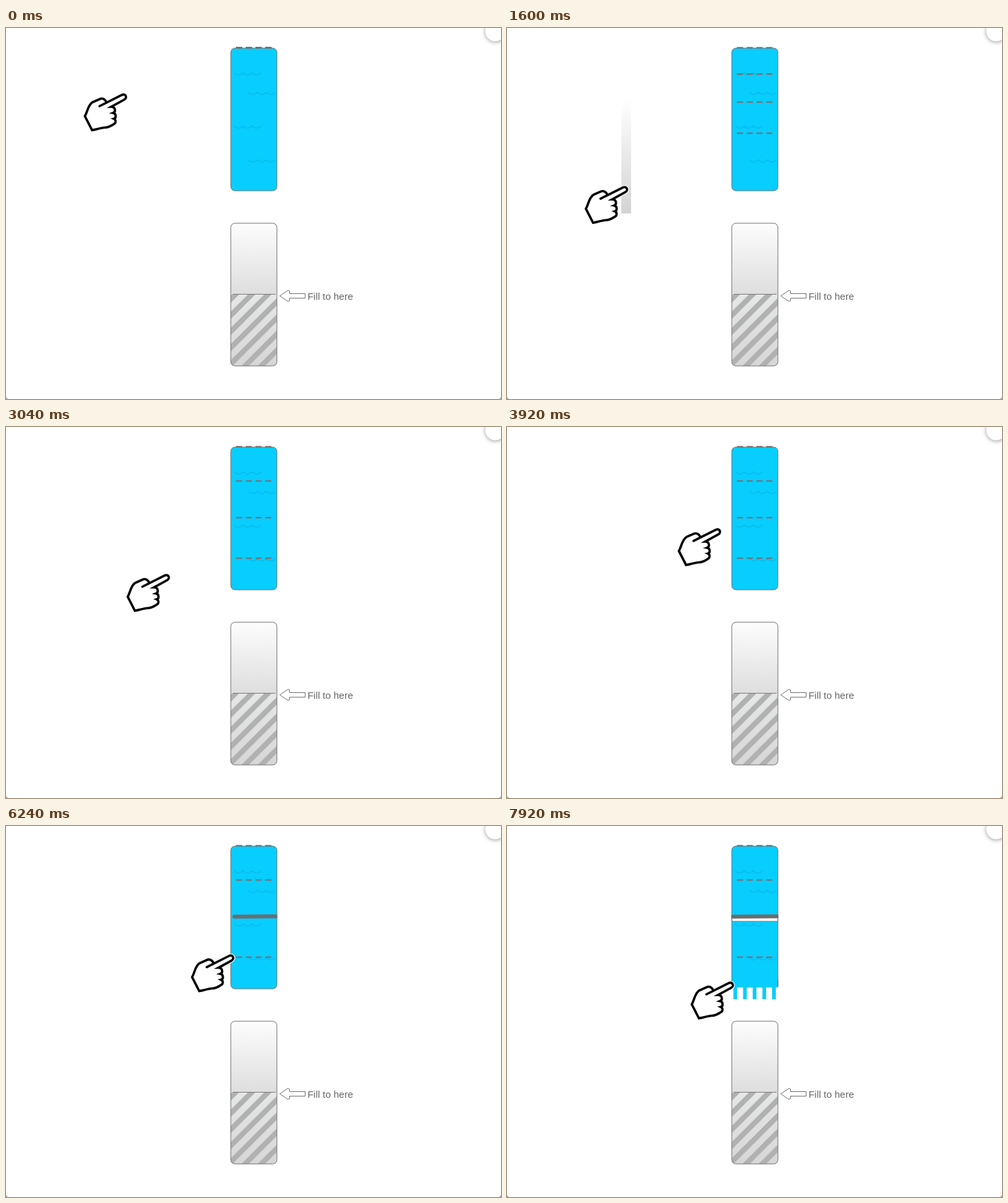
An HTML page with a canvas for the animation above (8 s loop, 762x572 px).

```html
<!DOCTYPE html>
<html lang="en">
<head>
<meta charset="utf-8">
<style>
html, body { margin: 0; width: 100%; height: 100%; overflow: hidden; background: #fff; }
canvas { display: block; }
</style>
</head>
<body>
<canvas id="stage" width="762" height="572"></canvas>
<script>
const ctx = document.getElementById('stage').getContext('2d');
const LOOP = 8000;
const LEFT = 346, WIDTH = 71, HEIGHT = 220;
const handShape = new Path2D(
  'M144 120.5 L178.500 103.200 C184 100.500 187.500 107.500 182 110.500 L162 121.500' +
  ' C169 121.500 169 129.500 165 131 C170 132 170 139 166 140 C170 142 169 146 167 147.500' +
  ' C162 151 157 153.500 152 153.500 C145 154 139 156.500 132.500 157.500 L121.500 136' +
  ' C126 128 126 119 133 114.500 L145.500 109 C150 108 152.500 110 154.500 114.500');

// time, x shift, y shift of the hand
const handPath = [
  [105, 0, 0], [2055, 0, 186], [2290, 0, 186], [4210, 168.5, 32],
  [5150, 168.5, 32], [6240, 165, 97], [6945, 163, 139], [LOOP, 163, 139]
];

const progress = (t, from, to) => Math.min(1, Math.max(0, (t - from) / (to - from)));

function handAt(t) {
  let i = 1;
  while (i < handPath.length - 1 && t > handPath[i][0]) i++;
  const [t0, x0, y0] = handPath[i - 1], [t1, x1, y1] = handPath[i];
  const k = progress(t, t0, t1);
  return [x0 + (x1 - x0) * k, y0 + (y1 - y0) * k];
}

function line(x1, y1, x2, y2, color, width = 1) {
  ctx.strokeStyle = color;
  ctx.lineWidth = width;
  ctx.beginPath();
  ctx.moveTo(x1, y1);
  ctx.lineTo(x2, y2);
  ctx.stroke();
}

function fade(y1, y2, from, to) {
  const g = ctx.createLinearGradient(0, y1, 0, y2);
  g.addColorStop(0, from);
  g.addColorStop(1, to);
  return g;
}

function tube(y) {
  ctx.beginPath();
  ctx.roundRect(LEFT, y, WIDTH, HEIGHT, 6.5);
}

function outline() {
  ctx.strokeStyle = '#707070';
  ctx.lineWidth = 1;
  ctx.stroke();
}

function wave(x, y) {
  ctx.strokeStyle = '#09bceb';
  ctx.lineWidth = 1.6;
  ctx.beginPath();
  ctx.moveTo(x, y - 2);
  for (let i = 0; i < 3; i++) {
    const a = x + i * 14;
    ctx.quadraticCurveTo(a + 7, y + 5, a + 14, y - 2);
  }
  ctx.stroke();
}

function dashes(y) {
  for (let i = 0; i < 4; i++) line(354 + i * 15, y, 363.5 + i * 15, y, '#7c6b69', 2);
}

function source(t) {
  const pour = progress(t, 7600, 7920);
  tube(31);
  ctx.fillStyle = '#08cdff';
  ctx.fill();
  outline();
  wave(351, 71);
  wave(373, 101);
  wave(351, 153);
  wave(373, 205);

  const spread = progress(t, 105, 2055);
  for (const d of [0, 53, 109.5, 172]) dashes(30.3 + d * spread);

  if (pour > 0) {
    ctx.fillStyle = '#fff';
    ctx.fillRect(347, 141, 69, 6 * pour);
    line(347, 141 + 6 * pour, 416, 141 + 6 * pour, '#777');
    ctx.fillStyle = '#fff';
    ctx.fillRect(345, 249, 73, 4);
    ctx.fillStyle = '#08cdff';
    ctx.fillRect(347, 240, 69, 9);
    line(LEFT, 238, LEFT, 249, '#707070');
    line(LEFT + WIDTH, 238, LEFT + WIDTH, 249, '#707070');
    for (let i = 0; i < 5; i++) ctx.fillRect(348.5 + i * 14.9, 249, 5.7, 18 * pour);
  }

  const drawn = progress(t, 4400, 4900);
  if (drawn > 0) {
    ctx.lineCap = 'round';
    const start = pour > 0 ? 348 : 351.5;
    line(start, 139.8, start + (415 - start) * drawn, 139.8 - 0.6 * drawn, '#6d6d6d', 6);
    ctx.lineCap = 'butt';
  }
}

function target() {
  ctx.save();
  tube(301);
  ctx.clip();
  ctx.fillStyle = fade(301, 410, '#fdfdfd', '#dedede');
  ctx.fillRect(346, 301, 72, 109);
  ctx.fillStyle = fade(410, 521, '#e5e8e6', '#d6d6d6');
  ctx.fillRect(346, 410, 72, 112);
  ctx.beginPath();
  ctx.rect(346, 411, 72, 111);
  ctx.clip();
  for (let sum = 764; sum < 945; sum += 25) {
    line(sum - 530, 530, sum - 400, 400, '#b1b1b1', 8);
  }
  ctx.restore();
  tube(301);
  outline();
  line(349, 410.5, 415, 410.5, '#777');

  ctx.beginPath();
  ctx.moveTo(421.5, 413);
  for (const [x, y] of [[434, 404.5], [436.5, 405.5], [436.5, 409.5], [460.5, 409.5],
    [460.5, 416.5], [436.5, 416.5], [436.5, 420.5], [434, 421.5]]) ctx.lineTo(x, y);
  ctx.closePath();
  ctx.fillStyle = '#fff';
  ctx.fill();
  outline();
  ctx.fillStyle = '#666';
  ctx.font = '15px "Liberation Sans", Arial, sans-serif';
  ctx.fillText('Fill to here', 464.2, 418.5);
}

function trail(t) {
  if (t < 960) return;
  ctx.globalAlpha = 1 - progress(t, 960, 2780);
  ctx.fillStyle = fade(108, 286, '#fff', '#bbb');
  ctx.fillRect(176, 108, 15, 178);
  ctx.globalAlpha = 1;
}

function hand(t) {
  ctx.save();
  ctx.translate(...handAt(t));
  ctx.lineCap = 'round';
  ctx.strokeStyle = ctx.fillStyle = '#fff';
  ctx.lineWidth = 6;
  ctx.stroke(handShape);
  ctx.fill(handShape);
  ctx.strokeStyle = '#000';
  ctx.lineWidth = 3.6;
  ctx.stroke(handShape);
  ctx.restore();
}

function corners() {
  ctx.save();
  ctx.shadowColor = 'rgba(0,0,0,.4)';
  ctx.shadowBlur = 6;
  ctx.shadowOffsetY = 1;
  ctx.fillStyle = '#fff';
  ctx.beginPath();
  ctx.arc(753.3, 5, 15.5, 0, 7);
  ctx.fill();
  ctx.restore();
  line(-1, 569.5, 2.5, 573, '#aaa', 2);
  line(763, 569.5, 759.5, 573, '#aaa', 2);
}

function frame(now) {
  const t = now % LOOP;
  ctx.fillStyle = '#fff';
  ctx.fillRect(0, 0, 762, 572);
  corners();
  source(t);
  target();
  trail(t);
  hand(t);
  requestAnimationFrame(frame);
}
requestAnimationFrame(frame);
</script>
</body>
</html>
```
